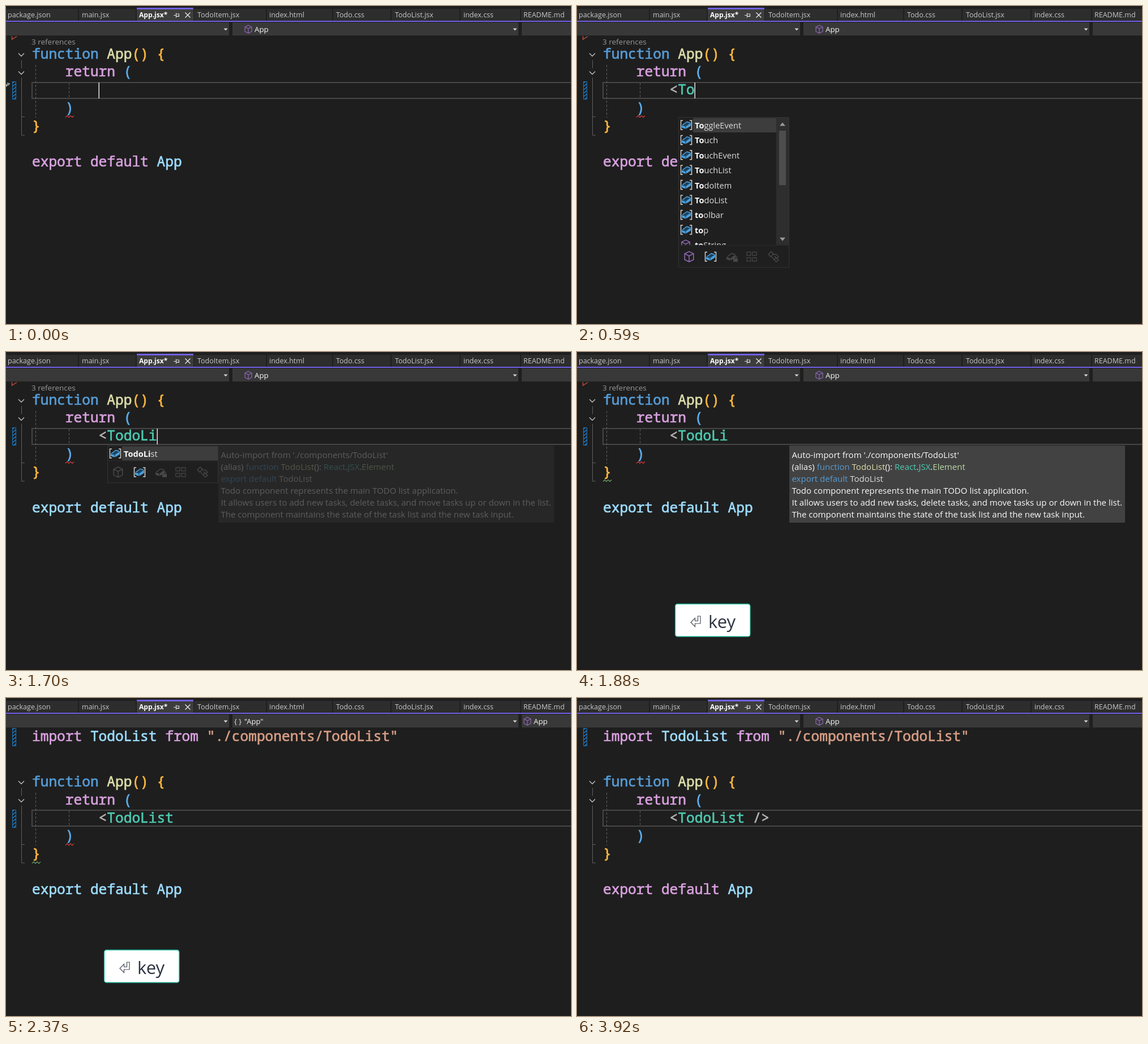
An HTML page with a canvas for the animation above (4 s loop, 998 px wide and 561 px high).

```html
<!DOCTYPE html>
<html lang="en">
<head>
<meta charset="utf-8">
<title>Auto-import</title>
<style>
html, body { margin: 0; width: 100%; height: 100%; overflow: hidden; background: #1e1e1e; }
canvas { display: block; }
</style>
</head>
<body>
<canvas id="stage" width="998" height="561"></canvas>
<script>
const ctx = document.getElementById('stage').getContext('2d');
const LOOP = 4000, PITCH = 14.7, LEFT = 46, LINE = 31.7, ROW = 26.4;
const C = {
  bg: '#1e1e1e', pink: '#d8a0df', blue: '#569cd6', func: '#dcdcaa', gold: '#ffb83d',
  paren: '#5caeef', ident: '#9cdcfe', teal: '#4ec9b0', string: '#d69d85',
  gray: '#b4b4b4', light: '#dcdcdc', white: '#fafafa', purple: '#7160e8', iface: '#b8d7a3'
};
const CODE = '500 24.5px "Noto Sans Mono", monospace';
const ui = (size, weight = 400) => `${weight} ${size}px "Open Sans", sans-serif`;

const TYPED = [
  [0, ''], [110, '<'], [300, '<T'], [480, '<To'], [660, '<Tod'], [810, '<Todo'],
  [1030, '<TodoL'], [1250, '<TodoLi'], [1920, '<TodoList'], [2880, '<TodoList '],
  [3180, '<TodoList /'], [3290, '<TodoList />']
];
const CARET_OFF = [[1810, 1920], [2370, 2880], [3920, 4000]];
const SUGGESTIONS = ['ToggleEvent', 'Touch', 'TouchEvent', 'TouchList', 'TodoItem',
  'TodoList', 'toolbar', 'top', 'toString'];
const TABS = [['package.json', 3, 0, 127], ['main.jsx', 134, 129, 229], ['TodoItem.jsx', 338, 332, 459],
  ['index.html', 465, 461, 576], ['Todo.css', 583, 578, 679], ['TodoList.jsx', 687, 681, 801],
  ['index.css', 808, 803, 908], ['README.md', 914, 910, 998]];

const between = (t, a, b) => t >= a && t < b;
const clamp = v => Math.max(0, Math.min(1, v));

function rect(x, y, w, h, color) {
  ctx.fillStyle = color;
  ctx.fillRect(x, y, w, h);
}

function line(path, color, width = 1, dash = []) {
  ctx.strokeStyle = color;
  ctx.lineWidth = width;
  ctx.setLineDash(dash);
  ctx.stroke(new Path2D(path));
}

function shape(path, color) {
  ctx.fillStyle = color;
  ctx.fill(new Path2D(path));
}

function at(x, y, draw) {
  ctx.save();
  ctx.translate(x, y);
  draw();
  ctx.restore();
}

// Alternating text and colour, laid out one after the other. Code gets a thin outline for weight.
function write(x, y, font, ...runs) {
  ctx.font = font;
  ctx.lineWidth = .7;
  ctx.setLineDash([]);
  for (let i = 0; i < runs.length; i += 2) {
    ctx.fillStyle = ctx.strokeStyle = runs[i + 1];
    ctx.fillText(runs[i], x, y);
    if (font === CODE) ctx.strokeText(runs[i], x, y);
    x += ctx.measureText(runs[i]).width;
  }
  return x;
}

const code = (col, y, ...runs) => write(LEFT + col * PITCH, y, CODE, ...runs);

function cube(x, y, color, s = 1) {
  at(x, y, () => {
    ctx.scale(s, s);
    line('M0-7L6-4V4L0 7L-6 4V-4ZM-6-4L0-1L6-4M0-1V7', color, 1.2);
  });
}

function brick(x, y, face, edge) {
  at(x, y, () => {
    shape('M-8 0L1-6.500L8-4.500V1.500L-1 7L-8 4.500Z', edge);
    shape('M-6 .5L1-4.800L6-3.300L-1 1.700Z', face);
    line('M-8 0L-1 2.500L8-4.500M-1 2.500V7', face);
  });
}

function fieldIcon(x, y) {
  brick(x, y, '#1e3e55', '#4a9fdc');
  at(x, y, () => line('M-6-8H-9.500V8H-6M6-8H9.500V8H6', '#d0d0d0', 1.5));
}

function squiggle(x, y, color) {
  at(x, y, () => line('M0 1.500L3-1.500L6 1.500L9-1.500L12 1.500L15-1.500', color, 1.1));
}

function changeMark(y) {
  ctx.save();
  ctx.beginPath();
  ctx.rect(11, y, 7, 32);
  ctx.clip();
  for (let k = 0; k < 7; k++) line(`M10 ${y + 6 * k + 4}l9-7`, '#1a78c2', 1.7);
  line(`M11.500 ${y + .5}h6v31h-6z`, '#1a78c2');
  ctx.restore();
}

function drawTabs() {
  rect(0, 0, 998, 28, '#1f1f1f');
  for (const [name, x, from, to] of TABS) {
    rect(from, 5, to - from, 21, '#2d2d2d');
    write(x, 19.5, ui(12.5), name, '#c8c8c8');
  }
  rect(231, 3, 100, 23, '#3d3d3d');
  rect(231, 3, 100, 3, C.purple);
  write(235, 20, ui(12.1, 700), 'App.jsx*', C.white);
  line('M296 16.500h4M300.500 12.500v8M301 14h4.500v4.500h-4.500M301 18h4', '#d8d8d8', 1.2);
  line('M316.500 11.500l9 9M325.500 11.500l-9 9', '#e8e8e8', 1.4);
  rect(0, 26, 998, 2, C.purple);
}

function drawNavigation(inModule) {
  rect(0, 28, 998, 25, '#1f1f1f');
  for (const [x, w] of [[0, 394], [400, 505], [911, 87]]) rect(x, 29, w, 23, '#383838');
  for (const x of [388, 899]) shape(`M${x - 3.5} 39.500h7l-3.500 3.700z`, '#d8d8d8');
  if (inModule) {
    write(403, 45.5, ui(13), '{ }', C.light);
    write(421, 46, ui(13), '"App"', C.white);
  }
  const x = inModule ? 921 : 428;
  cube(x, 41, '#9068b8');
  write(x + 11, 46, ui(13.3), 'App', C.white);
}

function drawGutter(dy) {
  at(0, dy, () => {
    for (const y of [86, 118]) line(`M22 ${y - 2.5}l5 5l5-5`, '#c0c0c0', 1.4);
    line('M27.500 95.500v14M27.500 126.500V228H33M27.500 195.500H33', '#606060');
    line('M52.500 104V197M111.500 136V163', '#606060', 1, [4, 3]);
  });
}

function drawCode(t, typed) {
  const imported = t >= 1920;
  const dy = imported ? 63.4 : 0;
  const stale = between(t, 1700, 3440);

  rect(45, Math.round(134 + dy), 953, 30, '#464646');
  rect(47, Math.round(134 + dy) + 2, 951, 26, C.bg);
  drawGutter(Math.round(dy));

  if (imported) {
    code(0, 76, 'import ', C.pink, 'TodoList ', C.ident, 'from ', C.pink, '"./components/TodoList"', C.string);
  } else {
    write(45, 67.5, ui(13.5), '3 references', '#999');
    line('M10.500 53v6l8.500-5.500', '#c8503c', 1.3);
  }
  if (t < 150) {
    line('M-1 142l4-4', '#aaa', 3);
    line('M2 136l4 1l-2 3', '#aaa', 1.5);
  }

  const y = n => 92.7 + dy + n * LINE;
  code(0, y(0), 'function ', C.blue, 'App', C.func, '() {', C.gold);
  code(4, y(1), 'return ', C.pink, '(', C.paren);
  code(8, y(2), typed.slice(0, 1), C.gray, typed.slice(1, 9), C.teal,
    typed.slice(9), typed.endsWith('>') ? C.gray : C.light);
  code(4, y(3), ')', C.paren);
  code(0, y(4), '}', C.gold);
  code(0, y(6), 'export default ', stale ? C.ident : C.pink, 'App', C.ident);

  if (t < 3440) squiggle(105, 195 + dy, '#e03c3c');
  if (between(t, 1740, 3880)) squiggle(46, 227 + dy, '#6fae6f');

  if (!CARET_OFF.some(([a, b]) => between(t, a, b))) {
    rect(Math.round(LEFT + (8 + typed.length) * PITCH) - .5, 135 + dy, 1.5, 28, '#e6e6e6');
  }

  if (imported && t >= 2070) changeMark(53);
  if (t < 1920) changeMark(133);
  else if (between(t, 2070, 3440)) changeMark(197);
}

function drawPopup(t, prefix) {
  const items = SUGGESTIONS.filter(s => s.toLowerCase().startsWith(prefix.toLowerCase()));
  const long = items.length > 8;
  const listHeight = Math.min(items.length, 8.55) * ROW;
  at(179, t < 620 ? 196 : 165, () => {
    rect(0, 0, 196, listHeight + 40, '#333');
    rect(1, 1, 194, listHeight + 38, '#1f1f1f');
    ctx.save();
    ctx.beginPath();
    ctx.rect(0, 0, 196, listHeight);
    ctx.clip();
    rect(26, 1.5, long ? 147 : 169, 25.5, '#3d3d3d');
    items.forEach((name, i) => {
      const y = i * ROW;
      if (name === 'toString') cube(13, y + 14, '#9068b8', 1.2);
      else fieldIcon(14, y + 14);
      const x = write(29, y + 20, ui(14.6, 700), name.slice(0, prefix.length), C.white);
      write(x, y + 20, ui(14.6), name.slice(prefix.length), C.light);
    });
    if (long) {
      rect(173, 1, 22, listHeight, '#2e2e2e');
      rect(178, 24, 12, 96, '#4d4d4d');
      shape('M179 15.500h10l-5-6zM179 212.500h10l-5 6z', '#999');
    }
    ctx.restore();

    rect(1, listHeight, 194, 1, '#2b2b2b');
    const y = listHeight + 20.5, dim = '#484848';
    cube(19, y, long ? '#9068b8' : dim, 1.3);
    fieldIcon(57, y);
    brick(93, y, C.bg, dim);
    rect(97, y + 3, 8, 6, dim);
    line(`M99 ${y + 3}v-3h4v3`, dim, 1.2);
    for (const dx of [121, 131]) line(`M${dx} ${y - 8}h7v6h-7zM${dx} ${y + 2}h7v6h-7z`, dim, 1.2);
    line(`M159 ${y - 4}l5-5l4 4l-5 5zM168 ${y - 4}h5l4 4l-3 3l-4-4M165 ${y}l4 5M169 ${y + 5}l4-3l4 4l-4 3z`, dim, 1.4);
  });
}

function drawTooltip() {
  rect(375, 165, 593, 136, '#424242');
  const text = (row, ...runs) => write(379.5, 187 + row * 21, ui(15), ...runs);
  text(0, "Auto-import from './components/TodoList'", C.white);
  text(1, '(alias) ', C.white, 'function ', C.blue, 'TodoList', C.func, '(): ', C.white,
    'React', C.teal, '.', C.white, 'JSX', C.teal, '.', C.white, 'Element', C.iface);
  text(2, 'export default ', C.blue, 'TodoList', C.light);
  text(3, 'Todo component represents the main TODO list application.', C.white);
  text(4, 'It allows users to add new tasks, delete tasks, and move tasks up or down in the list.', C.white);
  text(5, 'The component maintains the state of the task list and the new task input.', C.white);
}

function drawKey() {
  ctx.beginPath();
  ctx.roundRect(173.5, 444.5, 132.5, 57.5, 4);
  ctx.fillStyle = '#fff';
  ctx.fill();
  ctx.strokeStyle = '#1fb598';
  ctx.lineWidth = 1.3;
  ctx.setLineDash([]);
  ctx.stroke();
  line('M213.500 466h4.500v13h-9.500v5.500l-7.500-7.500l7.500-7.500v5h5z', '#4a505c', 1.2);
  write(232, 487, ui(31), 'key', '#2d3340');
}

function faded(alpha, draw) {
  if (alpha <= 0) return;
  ctx.globalAlpha = alpha;
  draw();
  ctx.globalAlpha = 1;
}

function render(t) {
  const typed = TYPED.findLast(([start]) => t >= start)[1];
  rect(0, 0, 998, 561, C.bg);
  drawCode(t, typed);
  drawTabs();
  drawNavigation(between(t, 2120, 2740));
  if (between(t, 340, 1860)) drawPopup(t, typed.slice(1));
  if (between(t, 1700, 1920)) faded(clamp(.25 + (t - 1700) / 160), drawTooltip);
  const keyAlpha = t < 2880 ? clamp((t - 1780) / 90) : clamp((2920 - t) / 80);
  faded(keyAlpha, drawKey);
}

function tick() {
  render(performance.now() % LOOP);
  requestAnimationFrame(tick);
}
tick();
</script>
</body>
</html>
```
